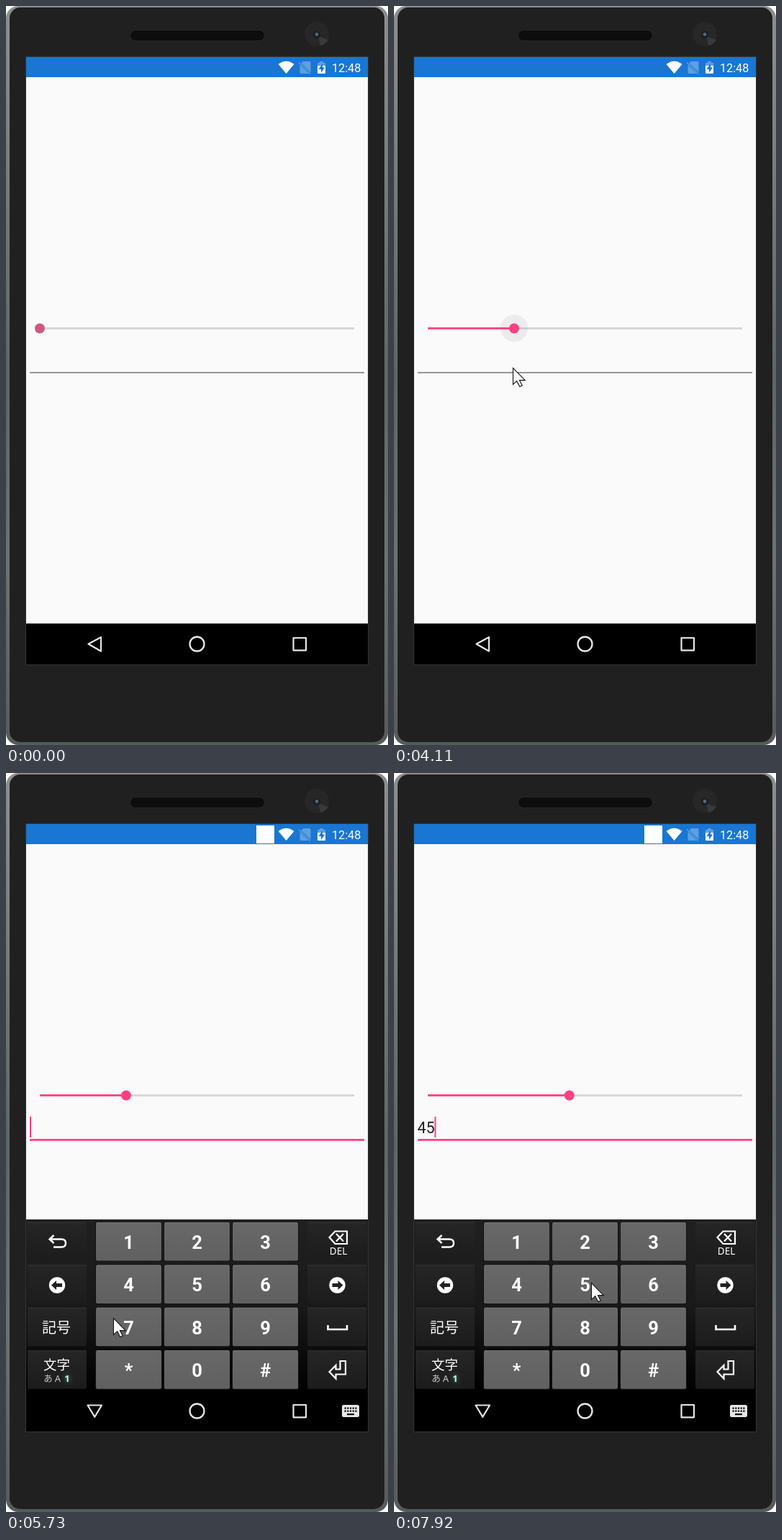
An HTML page with a canvas that plays this animation: 531x1028 px, repeating every 8000 ms.

```html
<!DOCTYPE html>
<html lang="en">
<head>
<meta charset="utf-8">
<title>Slider and entry</title>
<style>
html, body { margin: 0; width: 100%; height: 100%; overflow: hidden; background: #fff; }
canvas { display: block; }
</style>
</head>
<body>
<canvas id="stage" width="531" height="1028"></canvas>
<script>
const c = document.getElementById('stage').getContext('2d');
const LOOP = 8000, PINK = '#ff4081', PAPER = '#fafafa';
const SANS = 'Roboto, sans-serif', CJK = '"Noto Sans CJK JP", "Noto Sans CJK", sans-serif';

// Motion tracks: [time, value...]
const POINTER = [[230, 384, 947], [530, 118, 521], [690, 118, 521], [1530, 46, 449], [1610, 45, 449],
  [2000, 45, 449], [2690, 414, 459], [3100, 414, 459], [3640, 168, 464], [3800, 168, 464],
  [4110, 165, 503], [5110, 165, 503], [5580, 150, 812], [5730, 149, 758], [5960, 193, 706],
  [6680, 193, 706], [7060, 265, 711], [7850, 265, 711], [7920, 274, 709]];
const THUMB = [[2050, 47], [2770, 395], [2920, 417], [3110, 417], [3710, 167]];
const RADIUS = [[1950, 7], [2150, 10.5], [3830, 10.5], [4100, 7]];
const RIPPLE = [[2050, 0, 0], [2300, 19, .12], [3600, 19, .12], [3710, 19, .055], [4810, 19, .055], [4870, 19, 0]];
const FOCUS = 4640, KEYS_UP = 4800, TYPED = [6500, 7530];

function at(track, t) {
  const i = track.findIndex(k => k[0] > t);
  if (i === 0) return track[0].slice(1);
  if (i < 0) return track[track.length - 1].slice(1);
  const a = track[i - 1], b = track[i], u = (t - a[0]) / (b[0] - a[0]);
  return a.slice(1).map((v, n) => v + (b[n + 1] - v) * u);
}

function rect(x, y, w, h, fill, r = 0) {
  c.fillStyle = fill;
  c.beginPath();
  c.roundRect(x, y, w, h, r);
  c.fill();
}
function disc(x, y, r, fill) {
  c.fillStyle = fill;
  c.beginPath();
  c.arc(x, y, r, 0, 7);
  c.fill();
}
function shape(d, fill, stroke, width = 2) {
  const p = new Path2D(d);
  if (fill) { c.fillStyle = fill; c.fill(p); }
  if (stroke) { c.strokeStyle = stroke; c.lineWidth = width; c.stroke(p); }
}
function text(s, x, y, font, fill = '#fff', align = 'center') {
  c.font = font;
  c.fillStyle = fill;
  c.textAlign = align;
  c.fillText(s, x, y);
}
function shade(y0, y1, ...colors) {
  const g = c.createLinearGradient(0, y0, 0, y1);
  colors.forEach((col, i) => g.addColorStop(i / (colors.length - 1), col));
  return g;
}

function phone() {
  rect(0, 0, 531, 1028, '#fff');
  rect(0, 0, 531, 1028, shade(0, 1028, '#8b908f', '#747b79', '#5d6664', '#6b7371', '#565b5a'), 17);
  rect(5, 2, 521, 1022, '#202020', 15);
  rect(172, 33, 188, 16, '#272727', 8);
  rect(173, 34, 186, 14, '#0d0d0d', 7);
  disc(432, 39, 17, '#272727');
  shape('M434 42L448 47Q444 54 437 55Z', '#393939');
  disc(432, 40, 5, '#1b1d1f');
  disc(432, 39.5, 2.4, '#53687a');
  rect(27, 70, 477, 847, '#343434');
  rect(28, 71, 475, 788, PAPER);
  rect(28, 859, 475, 57, '#000');
}

function statusBar(t) {
  rect(28, 71, 475, 28, '#1976d2');
  if (t >= KEYS_UP) rect(348, 73, 25, 25, '#fff');
  shape('M378.5 81Q389.5 72.5 400.5 81L389.5 94Z', '#fff');
  const dim = '#5e9fdf';
  shape('M413 77H422Q423.5 77 423.5 79V94H410Q408.5 94 408.5 92V82Z', dim);
  shape('M406.5 78L424 95', null, '#1976d2', 3);
  shape('M407 78.5L423 94.5', null, dim, 1.5);
  rect(433, 79, 11, 15, '#fff', 1);
  rect(436, 77, 5, 3, dim);
  rect(433, 79, 11, 4, dim);
  shape('M440 80L434.5 88H438V93L443 85.5H440Z', '#1976d2');
  text('12:48', 453, 91.5, '16.2px ' + SANS, '#fff', 'left');
}

function slider(t) {
  const value = t < TYPED[0] ? at(THUMB, t)[0] : 47 + 437 * (t < TYPED[1] ? .04 : .45);
  const [ring, alpha] = at(RIPPLE, t);
  rect(47, 447, 437, 3, '#d8d8d8');
  disc(value, 448.5, ring, `rgba(0,0,0,${alpha})`);
  rect(47, 447, value - 47, 2.8, PINK);
  disc(value, 448.5, at(RADIUS, t)[0], t < 1950 ? '#cb5a80' : PINK);
}

function entry(t) {
  if (t < FOCUS) return rect(33, 509.3, 465, 1.4, '#737373');
  rect(33, 509, 465, 2.8, PINK);
  const count = TYPED.filter(k => t >= k).length;
  text('45'.slice(0, count), 32.5, 501, '21.5px ' + SANS, '#212121', 'left');
  const off = (t >= 4960 && t < 5460) || (t >= 5960 && t < 6460) || (t >= 7060 && t < TYPED[1]);
  if (!off) rect(33 + count * 11.7, 478, 2, 29, PINK);
}

function arrowDisc(x, y, dir) {
  disc(x, y, 11.2, '#fff');
  c.save();
  c.translate(x, y);
  c.scale(dir, 1);
  shape('M8 0L1 -6.5V-2.5H-7V2.5H1V6.5Z', '#222');
  c.restore();
}

function keyboard(t) {
  const u = Math.min(1, (t - KEYS_UP) / 310);
  if (u < 0) return;
  const p = 1 - (1 - u) ** 2;
  // The layer is translucent only while it slides in, so blend each part over an opaque copy of the page.
  c.save();
  c.beginPath();
  c.rect(28, 71, 475, 845);
  c.clip();
  c.translate(0, 76 * (1 - p));
  rect(28, 621, 475, 295, shade(621, 860, '#202020', '#191919', '#000'));
  '123456789*0#'.split('').forEach((label, i) => {
    const x = 125 + i % 3 * 95, y = 625 + (i / 3 | 0) * 59.4;
    const down = (label === '4' && t >= 6280 && t < 6590) || (label === '5' && t >= 7290 && t < 7620);
    rect(x - 1, y - 1, 93, 55.5, '#111', 2);
    rect(x, y, 91, 53.5, down ? '#8a8a8a' : shade(y, y + 54, '#686868', '#606060'), 2);
    rect(x + 1, y, 89, 1, '#777');
    text(label, x + 45.5, y + 37, 'bold 25.5px ' + SANS);
  });
  for (let i = 0; i < 8; i++) {
    const x = i % 2 ? 419 : 30, y = 625 + (i >> 1) * 59.4;
    rect(x, y, 82, 53.5, shade(y, y + 54, '#252525', '#1c1c1c'), 2);
    rect(x, y, 82, 1, '#343434');
  }
  shape('M61 648.5H77Q83 648.5 83 654Q83 659.5 77 659.5H66M66.5 643L60.5 648.5L66.5 654', null, '#fff', 2.4);
  shape('M449.5 646L457.5 637.5H474V655H457.5ZM459 641L469 651.5M469 641L459 651.5', null, '#fff', 2.2);
  text('DEL', 462, 669.5, '13.5px "Noto Sans", sans-serif');
  arrowDisc(71, 712.5, -1);
  arrowDisc(460.5, 712.5, 1);
  text('記号', 70, 779, '20px ' + CJK);
  shape('M447.5 768V774H474V768', null, '#fff', 2.6);
  text('文字', 70.5, 830, '18.5px ' + CJK);
  text('あ', 58.5, 847, '12.5px ' + CJK, '#ccc');
  text('A', 72, 847, '13px "Noto Sans", sans-serif', '#ccc');
  c.shadowColor = '#2fc49a';
  c.shadowBlur = 6;
  text('1', 85, 847, 'bold 13px "Noto Sans", sans-serif', '#d8f5ea');
  c.shadowBlur = 0;
  shape('M449.5 833L458.5 824V829.5H464.5V818H472V836.5H458.5V842.5Z', null, '#fff', 2.2);
  c.restore();
  if (p < 1) {
    c.globalAlpha = 1 - p;
    const top = 621 + 76 * (1 - p);
    rect(28, top, 475, 859 - top, PAPER);
    rect(28, 859, 475, 57, '#000');
    c.globalAlpha = 1;
  }
}

function navBar(t) {
  const open = t >= KEYS_UP, ink = '#e6e6e6';
  c.lineJoin = 'round';
  shape(open ? 'M113.5 879.5H133L123.3 895.8Z' : 'M114.5 887.5L132 878V897.5Z', null, ink, 2.2);
  shape('M255.5 887.5a10 10 0 1 0 20 0a10 10 0 1 0 -20 0Z', null, ink, 2.3);
  shape('M399.5 879H417V896.3H399.5Z', null, ink, 2.2);
  c.lineJoin = 'miter';
  if (!open) return;
  rect(467, 879, 24, 17, ink, 2.5);
  for (let i = 0; i < 10; i++) rect(470.5 + i % 5 * 3.7, 882.5 + (i / 5 | 0) * 4, 2.2, 2.2, '#000');
  rect(474, 891, 10, 2.2, '#000');
}

function pointer(t) {
  if (t < 230) return;
  c.save();
  c.translate(...at(POINTER, t));
  shape('M.5 .5V23.5L5.7 18.7L9.8 26.6L13.2 25L9.4 17.6H17.2Z', '#fff', '#111', 1.1);
  c.restore();
}

function draw(now) {
  const t = now % LOOP;
  phone();
  statusBar(t);
  slider(t);
  entry(t);
  keyboard(t);
  navBar(t);
  pointer(t);
}

let start;
function frame(now) {
  start ??= now;
  draw(now - start);
  requestAnimationFrame(frame);
}
requestAnimationFrame(frame);
</script>
</body>
</html>
```
